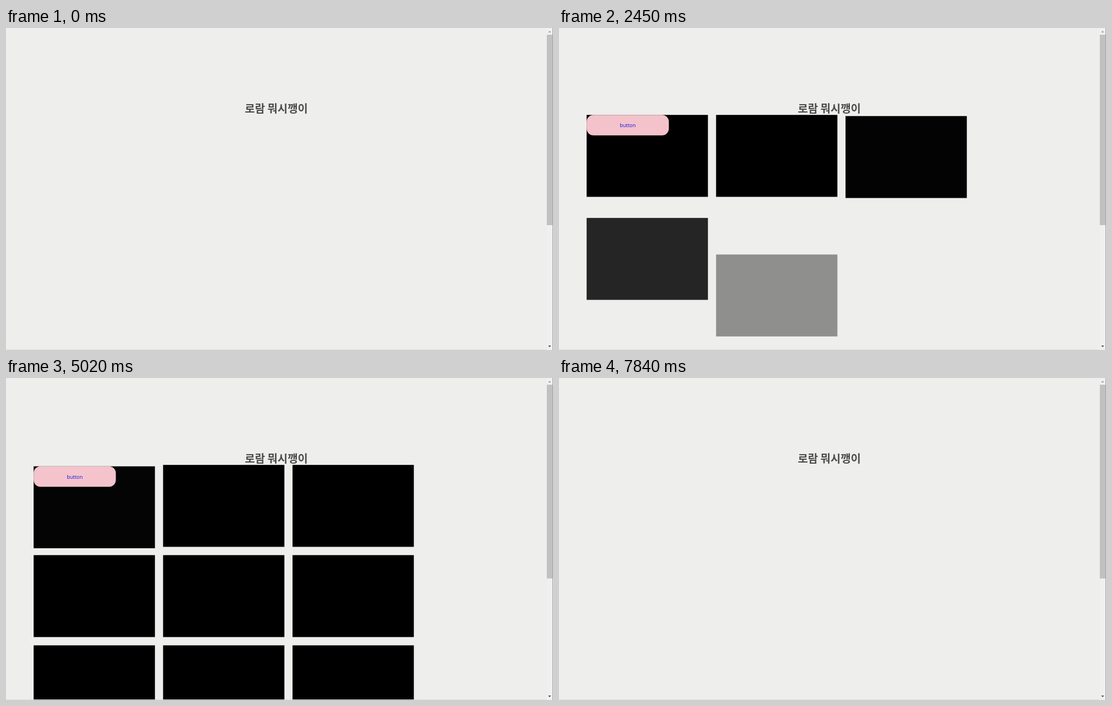
Recreate the animation shown at these times as an HTML page with a canvas. Size 974 by 575 pixels, loop 8.42 s.

```html
<!DOCTYPE html>
<html lang="ko">
<head>
<meta charset="utf-8">
<title>Staggered cards</title>
<style>
html, body { margin: 0; width: 100%; height: 100%; overflow: hidden; background: #eeeeec; }
canvas { display: block; }
</style>
</head>
<body>
<canvas id="stage" width="974" height="575"></canvas>
<script>
const W = 974, H = 575, LOOP = 8420;
const FADE = 1000, STAGGER = 300;
const BG = [238, 238, 236], BLACK = [0, 0, 0], PINK = [244, 194, 203], BLUE = [16, 16, 222];
const CARD = { x: 49.2, y: 155.2, w: 216, h: 146.3, dx: 230.5, dy: 161.1 };
const ctx = document.getElementById('stage').getContext('2d');

const bezier = (a, b, s) => 3 * (1 - s) * (1 - s) * s * a + 3 * (1 - s) * s * s * b + s * s * s;

// CSS "ease": cubic-bezier(.25, .1, .25, 1)
function ease(x) {
  if (x <= 0) return 0;
  if (x >= 1) return 1;
  let lo = 0, hi = 1;
  for (let i = 0; i < 24; i++) {
    const mid = (lo + hi) / 2;
    if (bezier(0.25, 0.25, mid) < x) lo = mid; else hi = mid;
  }
  return bezier(0.1, 1, lo);
}

function mix(color, p) {
  return 'rgb(' + color.map((c, i) => Math.round(BG[i] + (c - BG[i]) * p)).join(',') + ')';
}

function rect(color, x, y, w, h) {
  ctx.fillStyle = color;
  ctx.fillRect(x, y, w, h);
}

function text(str, font, color, x, y) {
  ctx.font = font;
  ctx.fillStyle = color;
  ctx.textAlign = 'center';
  ctx.textBaseline = 'alphabetic';
  ctx.fillText(str, x, y);
}

function arrow(color, x, y, dir) {
  ctx.fillStyle = color;
  ctx.beginPath();
  ctx.moveTo(x - 2.6, y + 1.4 * dir);
  ctx.lineTo(x + 2.6, y + 1.4 * dir);
  ctx.lineTo(x, y - 1.4 * dir);
  ctx.fill();
}

// How far card i is shown, 0 to 1
function shown(i, t) {
  if (t < 1100) return 0;
  if (t < 5020) return ease((t - 1006 - i * STAGGER) / FADE);
  const start = i < 3 ? 4990 : 5031;
  return 1 - ease((t - start - i * STAGGER) / FADE);
}

function drawCard(i, t) {
  const p = shown(i, t);
  if (p <= 0) return;
  const x = CARD.x + (i % 3) * CARD.dx;
  const y = CARD.y + Math.floor(i / 3) * CARD.dy + CARD.h * (1 - p);
  rect(mix(BLACK, p), x, y, CARD.w, CARD.h);
  if (i === 0) {
    ctx.fillStyle = mix(PINK, p);
    ctx.beginPath();
    ctx.roundRect(x, y, 146.4, 36.6, 12.2);
    ctx.fill();
    text('button', '9px "Open Sans", "Noto Sans", sans-serif', mix(BLUE, p), x + 73.2, y + 22);
  }
}

function drawScrollbar(t) {
  rect('#f0f0f0', 963, 0, 10, H);
  rect('#c1c1c1', 963, 12, 10, (t < 4390 ? 352 : 358) - 12);
  arrow('#a0a0a0', 968, 6.5, 1);
  arrow('#505050', 968, 568.5, -1);
  rect('#a2a2a2', 973, 0, 1, H);
}

function draw(t) {
  rect(mix(BG, 1), 0, 0, W, H);
  text('로람 뭐시깽이', 'bold 19.5px "Noto Sans CJK KR", "Noto Sans CJK", sans-serif', '#4b4b4b', 481.3, 150.8);
  for (let i = 0; i < 9; i++) drawCard(i, t);
  rect('#dededc', 0, 574, W, 1);
  drawScrollbar(t);
}

const begin = performance.now();
function tick() {
  draw((performance.now() - begin) % LOOP);
  requestAnimationFrame(tick);
}
tick();
</script>
</body>
</html>
```
